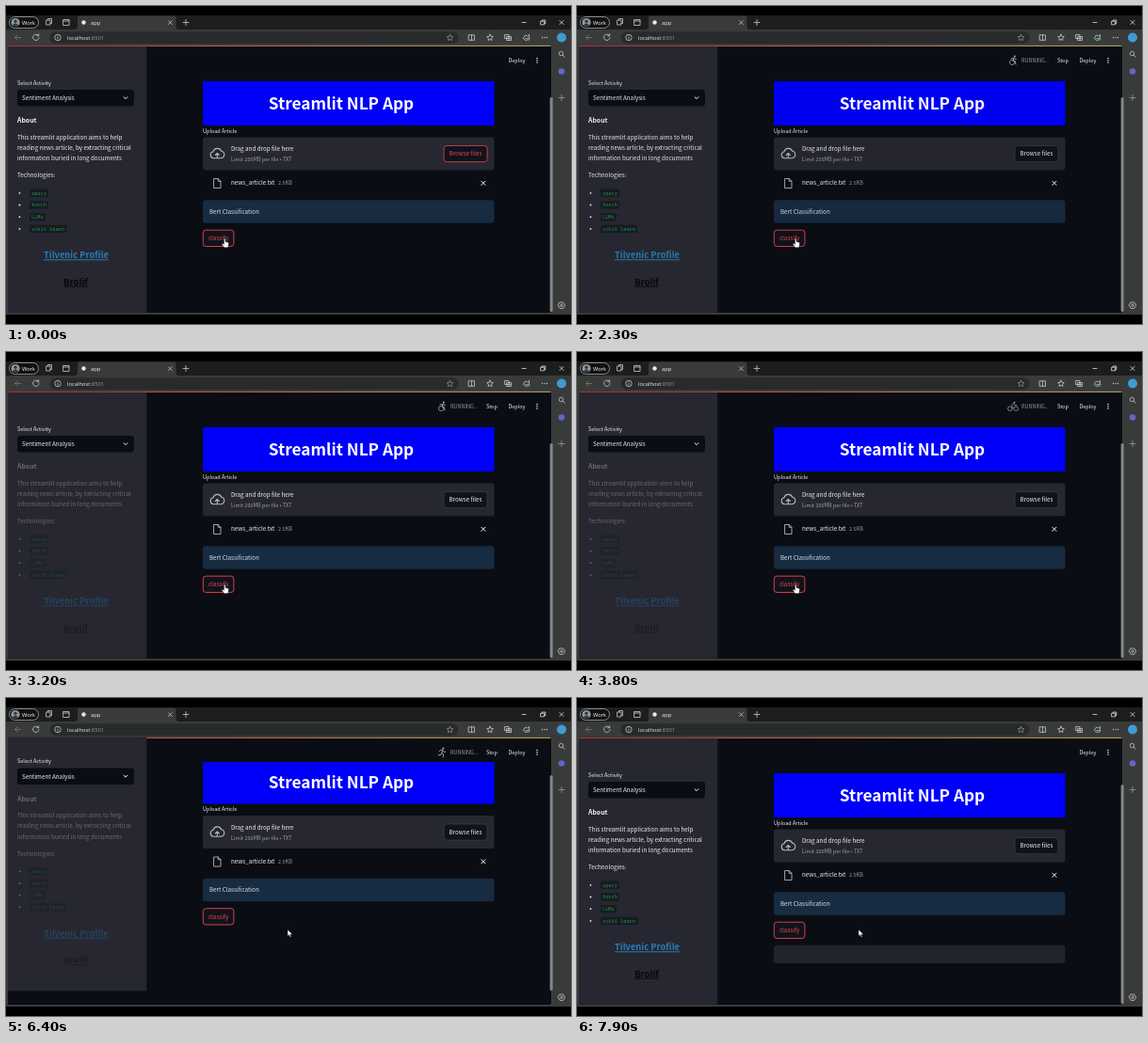
Write an HTML page that moves like this. It is 600x338 px and loops after 8 s.

```html
<!DOCTYPE html>
<html lang="en">
<head>
<meta charset="utf-8">
<title>Streamlit NLP App</title>
<style>
html, body { margin: 0; width: 100%; height: 100%; overflow: hidden; background: #000; }
svg { display: block; width: 100vw; height: 100vh; }
text { font-family: "Noto Sans CJK JP", "Noto Sans CJK SC", "Noto Sans CJK", "Open Sans", sans-serif; white-space: pre; }
.ui { font-family: "Open Sans", "Noto Sans", sans-serif; }
.code { font-family: "Noto Sans Mono", "DejaVu Sans Mono", monospace; }
</style>
</head>
<body>
<svg id="stage" viewBox="0 0 600 338">
  <defs>
    <linearGradient id="deco"><stop stop-color="#e04848"/><stop offset="1" stop-color="#c9c170"/></linearGradient>
    <clipPath id="page"><path d="M2 327V44q0-2.5 2.5-2.5H577q2 0 2 2.5V324q0 2-2 2H2z"/></clipPath>
  </defs>
  <g id="chrome"></g>
  <g clip-path="url(#page)">
    <rect x="2" y="41" width="578" height="286" fill="#0a0d14"/>
    <g id="main"></g>
    <rect x="149" y="42" width="430" height="26" fill="#0a0d14"/>
    <rect x="2" y="41.5" width="577" height="1.3" fill="url(#deco)"/>
    <g id="side"></g>
    <g id="header"></g>
  </g>
  <rect id="thumb" x="577.6" width="3" rx="1.5" fill="#85868a"/>
  <g id="arrow"><path d="M0 0V7.2L1.7 5.7 2.8 8.2 4 7.7 2.9 5.3H5.2z" fill="#fff" stroke="#111" stroke-width=".5"/></g>
  <g id="hand"><path d="M-.9-4.6q.9-.8 1.6 0V-1.5l2.8.7q.9.3.7 1.3L3.5 4.7H-.6L-3.1 1.2q-.2-1 .8-.9l1.4 1z" fill="#fff" stroke="#111" stroke-width=".5"/></g>
</svg>
<script>
const LOOP = 8000;
const CLICK = 1600, FADE = 2120, RERUN = 3200, LEAVE = 4200, ARRIVE = 4700;
const PULL = 6000, RELEASE = 6850, DONE = 7350;
const RED = '#ef4350', WHITE = '#f2f3f6', GREY = '#9b9da4';

const $ = id => document.getElementById(id);
const fill = (id, ...parts) => { $(id).innerHTML = parts.join(''); };
const rect = (x, y, w, h, color, r = 0, extra = '') =>
  `<rect x="${x}" y="${y}" width="${w}" height="${h}" rx="${r}" fill="${color}" ${extra}/>`;
const text = (x, y, s, size = 6.27, color = WHITE, extra = '') =>
  `<text x="${x}" y="${y}" font-size="${size}" fill="${color}" ${extra}>${s}</text>`;
const line = (d, color = '#c8c8c8', w = .8) =>
  `<path d="${d}" fill="none" stroke="${color}" stroke-width="${w}" stroke-linecap="round" stroke-linejoin="round"/>`;
const ring = (x, y, r, color = '#c8c8c8', w = .8) =>
  `<circle cx="${x}" cy="${y}" r="${r}" fill="none" stroke="${color}" stroke-width="${w}"/>`;
const dot = (x, y, r, color) => `<circle cx="${x}" cy="${y}" r="${r}" fill="${color}"/>`;
const group = (id, ...parts) => `<g id="${id}">${parts.join('')}</g>`;
const centred = 'text-anchor="middle"';
const ui = 'class="ui"';

fill('chrome',
  rect(0, 10, 600, 318, '#1c1e1e'),
  rect(0, 25, 600, 303, '#393b3b'),
  `<path d="M73 25q3 0 3-3V13q0-2.500 2.500-2.500H178q2.500 0 2.500 2.500V22q0 3 3 3z" fill="#393b3b"/>`,
  rect(3.500, 11.500, 31, 12, '#111', 6, 'stroke="#b8b8b8" stroke-width=".7"'),
  dot(10, 17.500, 4.600, '#8b9aa6'), dot(10, 16.200, 1.700, '#343a44'),
  `<path d="M6.700 20.700q3.300-5 6.600 0-3.300 2.500-6.600 0z" fill="#343a44"/>`,
  text(17, 19.600, 'Work', 5.700, '#fff', ui),
  line('M43 15h4v5h-4zM44.500 15v-1.500h4v5H47M61 14.500h6v6h-6zM61 16h6'),
  dot(82.500, 17.500, 2.200, '#e8e8e8'),
  text(90, 19.600, 'app', 5.800, '#eee', ui),
  line('M172.500 15.700l3.800 3.800m0-3.800l-3.800 3.800M188 17.500h6m-3-3v6'),
  line('M548 17.500h4M568 16.200h3.600v3.600H568zM569.200 16.200v-1.200h3.600v3.600h-1.200M588 15.500l4 4m0-4l-4 4', '#ddd'),
  line('M15.500 33.500H9.500m2.700-2.700L9.500 33.500l2.700 2.700', '#777'),
  line('M34.300 31.300A3.200 3.200 0 1 0 35 33.500M34.700 29.800v1.900h-1.900'),
  rect(46.500, 27.200, 434, 12.800, '#282a2b', 6.400),
  ring(55, 33.500, 3.200), line('M55 33.300v1.700M55 31.900v.1'),
  `<text class="ui" x="65" y="35.600" font-size="5.800" fill="#eee">localhost<tspan fill="#999">:8501</tspan></text>`,
  line('M471.500 30.300l1 2.100 2.300.300-1.700 1.600.400 2.300-2-1.100-2 1.100.400-2.300-1.700-1.600 2.300-.300z', '#aaa', .6),
  line('M491.500 30.800h6v5.500h-6zM494.500 30.800v5.500'),
  line('M514 30.200l1 2.100 2.300.300-1.700 1.600.400 2.300-2-1.100-2 1.100.400-2.300-1.700-1.600 2.300-.300z'),
  line('M530 30.500h4v4h-4zM532 32.500h4.500v4H532zM534.200 33.300v2.400M533 34.500h2.400'),
  line('M549.500 34l2-3 2 1 2-1.500v4l-3 2zM552 34.500h4'),
  dot(554.500, 35.200, 1.500, '#46a85c'),
  [569.500, 572, 574.500].map(x => dot(x, 33.500, .65, '#ccc')).join(''),
  dot(590, 33.500, 5, '#3f9bd4'),
  ring(589.500, 50.500, 2.200), line('M591.200 52.300l2 2'),
  dot(590, 69.500, 3.300, '#6366c4'),
  line('M587 97.500h6m-3-3v6', '#999'),
  line('M588.300 315l3.400 0 2 3.200-2 3.200h-3.400l-2-3.200z'), ring(590, 318.200, 1.200)
);

fill('side',
  rect(2, 42.800, 147.300, 283, '#262730'),
  group('select',
    text(12, 83.700, 'Select Activity', 5.500),
    rect(12, 89, 124, 17.500, '#0a0d14', 3),
    text(17, 100.200, 'Sentiment Analysis'),
    line('M125 96.700l2 2 2-2', WHITE, 1)),
  group('about',
    text(12, 124.200, 'About', 6.900, WHITE, 'font-weight="700"'),
    ['This streamlit application aims to help', 'reading news article, by extracting critical', 'information buried in long documents']
      .map((s, i) => text(12, 141.500 + i * 11.250, s)).join(''),
    text(12, 182.200, 'Technologies:'),
    ['spacy', 'torch', 'LLMs', 'sckit learn'].map((s, i) => {
      const y = 198.800 + i * 12.700;
      return dot(14.500, y, .9, WHITE) + rect(25, y - 4.200, s.length * 3.200 + 4, 8.400, '#171b22', 1.500) +
        text(27, y + 1.700, s, 5.300, '#1c9c40', 'class="code"');
    }).join(''),
    text(74.500, 268.300, 'Tilvenic Profile', 9.400, '#2a7db9', centred + ' font-weight="600" text-decoration="underline"'),
    text(74, 296.700, 'Brolif', 9.400, '#050609', centred + ' font-weight="600" text-decoration="underline"'))
);

fill('main',
  group('body',
    rect(209, 80, 309.500, 47, '#0000fa'),
    text(356, 110.300, 'Streamlit NLP App', 17.200, '#fff', centred + ' font-weight="700"'),
    text(209, 134.700, 'Upload Article', 5.500),
    rect(209, 139.500, 309.500, 35, '#262730', 3),
    line('M220.300 161.700a3.500 3.500 0 0 1-.300-6.900 4.600 4.600 0 0 1 8.700-.600 3.800 3.800 0 0 1-.300 7.500zM224.300 161v-4.500m-2 2l2-2 2 2', '#b5b7bf', 1.100),
    text(239, 154.300, 'Drag and drop file here'),
    text(239, 165.200, 'Limit 200MB per file • TXT', 5.500, GREY),
    rect(465, 148.500, 46, 17.200, '#10131b', 3, 'id="browseBox" stroke-width=".8"'),
    text(488, 159.200, 'Browse files', 6.270, WHITE, centred + ' id="browse"'),
    line('M221 183.500h4.200l2.800 2.800v7.200h-7zM225.200 183.500v2.800h2.800', '#b5b7bf', .9),
    text(239, 190.300, 'news_article.txt'),
    text(289, 190.300, '2.5KB', 5.500, GREY),
    line('M504.800 186.200l4.200 4.200m0-4.200l-4.200 4.200', WHITE, 1),
    rect(209, 206.300, 309.500, 24.400, '#172b41', 3),
    text(216, 220.800, 'Bert Classification', 6.270, '#dbe6f1'),
    rect(209.300, 238.200, 32.600, 17.300, '#10131b', 3, `stroke="${RED}" stroke-width=".9"`),
    text(225.600, 249.200, 'classify', 6.270, RED, centred)),
  group('result', rect(209, 262.700, 309.500, 19.300, '#22242d', 3))
);

const ICONS = {
  bike: ring(459.800, 60.200, 2.300, GREY) + ring(466.200, 60.200, 2.300, GREY) + dot(464.500, 53.800, 1, GREY) +
    line('M462.700 60.200v-2.200l-1.500-1.500 2-1.700 1.600 1.700h2', GREY),
  runner: dot(464.300, 53.700, 1.100, GREY) +
    line('M460 57l1.600-1.800 2.200.300-1.200 3 2 1.300-.500 3M462.600 58.500l-.800 2-2.800.300M463.700 55.800l1.200 1.500h1.800', GREY, 1),
  wheel: ring(462, 60, 2.600, GREY) + dot(464.800, 53.700, 1.100, GREY) +
    line('M461 56l2.800-.600-.800 3.100h2.200l.800 3.500M463.600 55.800l2.800.800', GREY, 1)
};
fill('header',
  group('running',
    Object.entries(ICONS).map(([name, icon]) => group(name, icon)).join(''),
    text(472, 60, 'RUNNING...', 5.500, GREY),
    text(510, 60, 'Stop', 5.500, WHITE, 'font-weight="500"')),
  text(533.500, 60, 'Deploy', 5.500, WHITE, 'font-weight="500"'),
  [55.500, 57.800, 60.100].map(y => dot(564, y, .75, WHITE)).join('')
);

const clamp = v => Math.min(1, Math.max(0, v));
const smooth = v => v * v * (3 - 2 * v);
const set = (id, name, value) => $(id).setAttribute(name, value);
const show = (id, on) => set(id, 'visibility', on ? 'inherit' : 'hidden');

function draw(t) {
  const stale = 1 - .67 * clamp((t - FADE) / 1000) ** 1.75;
  set('body', 'opacity', t < RERUN ? stale : 1);
  set('select', 'opacity', t < RERUN ? stale : 1);
  set('about', 'opacity', t < DONE ? stale : 1);

  const running = t >= CLICK && t < DONE;
  const phase = (t + 20) % 1200;
  show('running', running);
  Object.keys(ICONS).forEach((name, i) => show(name, running && Math.floor(phase / 400) === i));

  const focused = t < CLICK;
  set('browseBox', 'stroke', focused ? RED : '#3b3e47');
  set('browse', 'fill', focused ? RED : WHITE);
  show('result', t >= DONE);

  const pulled = t >= PULL && t < RELEASE;
  const shift = `translate(0 ${pulled ? -14.5 : 0})`;
  set('main', 'transform', shift);
  set('side', 'transform', shift);
  const top = pulled ? 82 : t >= DONE ? 92 : 97;
  set('thumb', 'y', top);
  set('thumb', 'height', (pulled ? 311 : 325) - top);

  const k = smooth(clamp((t - LEAVE) / (ARRIVE - LEAVE)));
  const x = 231.5 + 67.5 * k, y = 247 - k;
  const overButton = x < 242;
  show('hand', overButton);
  show('arrow', !overButton);
  set('hand', 'transform', `translate(${x + .8} ${y + 5})`);
  set('arrow', 'transform', `translate(${x} ${y})`);
}

const start = performance.now();
function tick() {
  draw((performance.now() - start) % LOOP);
  requestAnimationFrame(tick);
}
tick();
</script>
</body>
</html>
```
